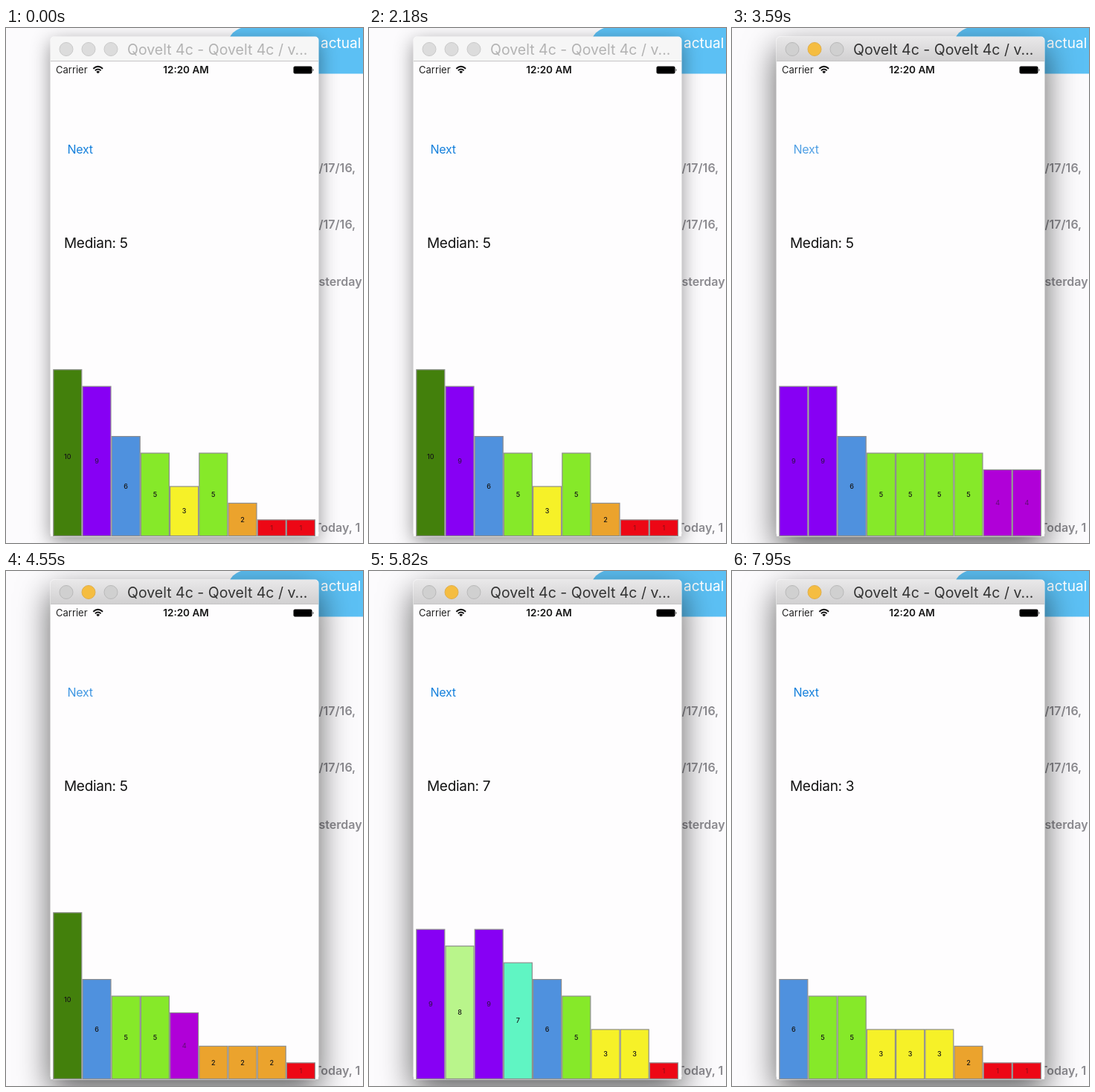
These frames come from a looping animation (480 by 693 pixels, 8 s). An HTML page:

```html
<!DOCTYPE html>
<html lang="en">
<head>
<meta charset="utf-8">
<title>Bar chart simulator</title>
<style>
  html, body { margin: 0; width: 100%; height: 100%; overflow: hidden; background: #fcfbfd; }
  svg { display: block; width: 480px; height: 693px; font-family: Inter, Roboto, sans-serif; }
  .shadow { fill: #fefdfe; filter: drop-shadow(0 7px 13px rgba(0,0,0,.42)); }
  .focused .shadow { filter: drop-shadow(0 16px 22px rgba(0,0,0,.62)); }
  .titlebar { fill: #f6f6f6; }
  .focused .titlebar { fill: url(#chrome); }
  .title { font-size: 19.5px; fill: #b3b3b3; }
  .focused .title { fill: #333; }
  .light { fill: #dcdcdc; stroke: #c9c9c9; }
  .focused .light { fill: #d0d0d0; stroke: #b9b9b9; }
  .focused .minimise { fill: #f5bd41; stroke: #dfae4c; }
  .date { font-size: 16px; font-weight: 600; fill: #8c8b90; }
  .bar { stroke: #8e8e8e; stroke-width: 1.2; }
  .value { font-size: 9px; font-weight: 500; text-anchor: middle; fill: #161616; }
</style>
</head>
<body>
<svg id="stage" viewBox="0 0 480 693">
  <defs>
    <linearGradient id="chrome" x2="0" y2="1">
      <stop stop-color="#e9e8e9"/><stop offset="1" stop-color="#d1d0d1"/>
    </linearGradient>
  </defs>
  <rect width="480" height="693" fill="#fcfbfd"/>
  <rect x="298" y="-1" width="220" height="62.5" rx="25" fill="#5cc0f4"/>
  <text x="423" y="27" font-size="19" fill="#fff">actual</text>
  <g class="date">
    <text x="420.5" y="194">/17/16,</text>
    <text x="420.5" y="270">/17/16,</text>
    <text x="420.5" y="347">sterday</text>
    <text x="414" y="678">Today, 1</text>
  </g>

  <rect class="shadow" x="59.5" y="11.5" width="361" height="673" rx="5"/>
  <rect x="60" y="40" width="360" height="644" fill="#fefdfe"/>
  <path class="titlebar" d="M60 44V17q0-5 5-5H415q5 0 5 5V44z"/>
  <path d="M60 44.5H420" stroke="#c6c5c6"/>
  <circle class="light" cx="81" cy="28.5" r="9"/>
  <circle class="light minimise" cx="111" cy="28.5" r="9"/>
  <circle class="light" cx="141" cy="28.5" r="9"/>
  <text class="title" x="163" y="36">Qovelt 4c - Qovelt 4c / v...</text>

  <text x="67" y="61" font-size="13" fill="#222">Carrier</text>
  <g fill="none" stroke="#111" stroke-width="1.9">
    <path d="M117.3 54.7Q123.7 48.8 130.1 54.7M119.8 57.3Q123.7 53.8 127.6 57.3"/>
    <path d="M121.3 58.9Q123.7 56.8 126.1 58.9L123.7 61.3z" fill="#111" stroke="none"/>
  </g>
  <text x="242" y="61" font-size="13.5" font-weight="600" text-anchor="middle" fill="#151515">12:20 AM</text>
  <rect x="386.5" y="51.5" width="25" height="10" rx="2" fill="#000"/>
  <path d="M412.5 54.5q2 2 0 4z" fill="#222"/>

  <text id="next" x="82.5" y="169" font-size="16" letter-spacing="-.3" fill="#1580dc">Next</text>
  <text id="median" x="78" y="296" font-size="19" letter-spacing="-.3" fill="#111"></text>
  <g id="chart"></g>
</svg>
<script>
const LOOP = 8000, FOCUS_AT = 2350, HOLD = 100, FADE = 470;
const BASE = 684, LEFT = 63.2, BAR_WIDTH = 39.2, UNIT = 22.45, INSET = .6;

// Each step: time the button is released, then the bar values it reveals.
const steps = [
  [0, [10, 9, 6, 5, 3, 5, 2, 1, 1]],
  [3270, [9, 9, 6, 5, 5, 5, 5, 4, 4]],
  [4190, [10, 6, 5, 5, 4, 2, 2, 2, 1]],
  [5250, [9, 8, 9, 7, 6, 5, 3, 3, 1]],
  [6800, [9, 8, 9, 7, 1, 5, 5, 6, 1]],
  [7400, [6, 5, 5, 3, 3, 3, 2, 1, 1]]
];
const colors = ['', '#ed0715', '#eba32d', '#f6f128', '#b000d8', '#86e929',
  '#4f91de', '#60f5c3', '#b9f58b', '#8700f4', '#43800c'];
const faint = { 1: .4, 4: .45, 9: .7 };

const stage = document.getElementById('stage');
const next = document.getElementById('next');
const median = document.getElementById('median');
const chart = document.getElementById('chart');

function set(node, attrs) {
  for (const key in attrs) node.setAttribute(key, attrs[key]);
}

function add(name, attrs) {
  const node = document.createElementNS(stage.namespaceURI, name);
  set(node, attrs);
  return chart.appendChild(node);
}

const bars = steps[0][1].map((_, i) => {
  const x = LEFT + i * BAR_WIDTH;
  return {
    box: add('rect', { class: 'bar', x: x + INSET, width: BAR_WIDTH - 2 * INSET }),
    label: add('text', { class: 'value', x: x + BAR_WIDTH / 2 })
  };
});

let shown = -1;
function showStep(index) {
  if (index === shown) return;
  shown = index;
  const values = steps[index][1];
  median.textContent = 'Median: ' + values[3];
  bars.forEach(({ box, label }, i) => {
    const value = values[i], height = value * UNIT;
    set(box, { y: BASE - height + INSET / 2, height: height - 1.5 * INSET, fill: colors[value] });
    set(label, { y: BASE - height / 2 + (value === 10 ? 8 : 3), opacity: faint[value] || 1 });
    label.textContent = value;
  });
}

function buttonOpacity(t) {
  let opacity = 1;
  for (const [release] of steps.slice(1)) {
    if (t >= release - HOLD && t < release + FADE)
      opacity = .2 + .8 * Math.max(0, (t - release) / FADE);
  }
  return opacity;
}

function render(now) {
  const t = now % LOOP;
  stage.classList.toggle('focused', t >= FOCUS_AT);
  showStep(steps.filter(([time]) => time <= t).length - 1);
  next.setAttribute('opacity', buttonOpacity(t));
}

const start = performance.now();
function tick() {
  render(performance.now() - start);
  requestAnimationFrame(tick);
}
tick();
</script>
</body>
</html>
```
